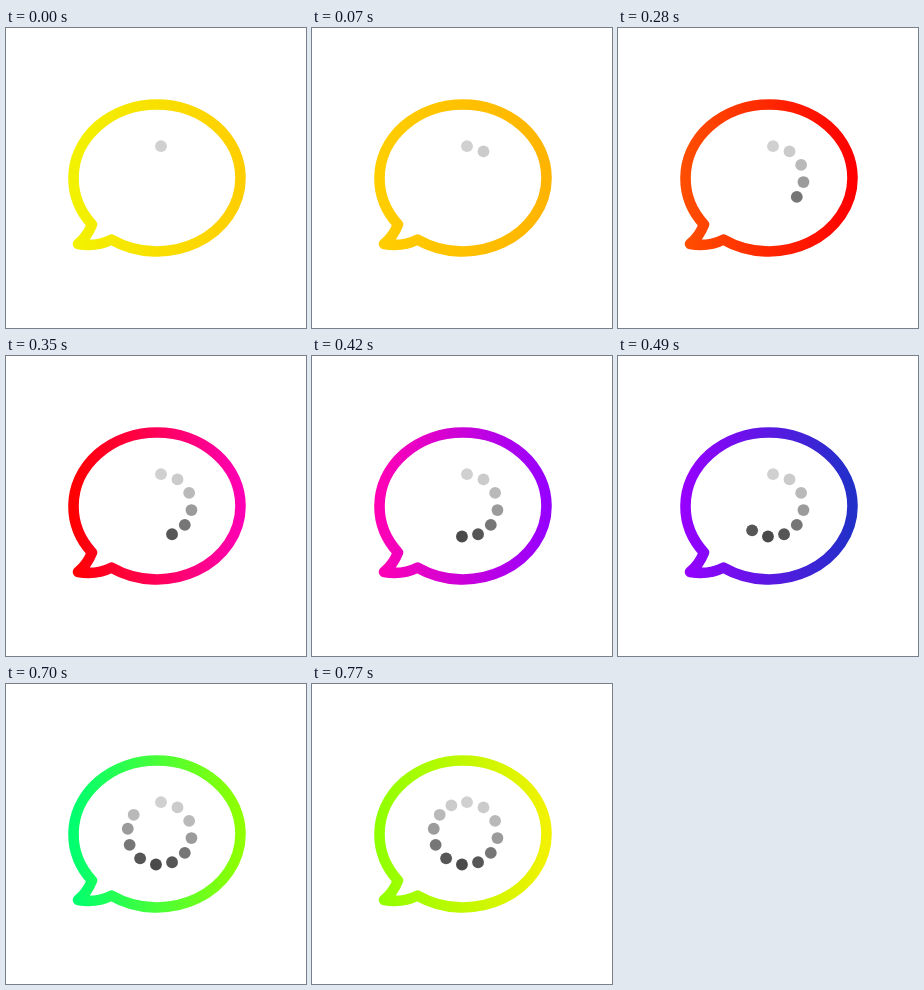
Recreate the animation shown at these times as an HTML page. Size 300 by 300 pixels, loop 840 ms.

```html
<!DOCTYPE html>
<html lang="en">
<head>
<meta charset="utf-8">
<title>Speech bubble loader</title>
<style>
  html, body { margin: 0; width: 100%; height: 100%; overflow: hidden; background: #fff; }
  svg { display: block; width: 100vw; height: 100vh; }
</style>
</head>
<body>
<svg viewBox="0 0 300 300">
  <defs>
    <linearGradient id="hue" gradientUnits="userSpaceOnUse" x1="66" y1="0" x2="236" y2="0">
      <stop id="left" offset="0"/><stop id="right" offset="1"/>
    </linearGradient>
  </defs>
  <path d="M86 196.500 A83.500 73.500 0 0 1 67.500 150 A83.500 73.500 0 0 1 234.500 150
           A83.500 73.500 0 0 1 105.500 211.600 Q91 219 72 216 Q81 209 86 196.500 Z"
        fill="none" stroke="url(#hue)" stroke-width="10.600" stroke-linejoin="round"/>
  <g id="dots"></g>
</svg>
<script>
  const STEP = 70;
  const COUNT = 12;

  // each step blends one colour into the next, left to right
  const wheel = ('#f2f200 #ffce00 #ffb400 #ff9600 #ff4e00 #ff0000 ' +
                 '#ff00b4 #9600ff #2030c8 #00b8ff #00ff70 #90ff00').split(' ');

  const left = document.getElementById('left');
  const right = document.getElementById('right');
  const group = document.getElementById('dots');

  function makeDot(i) {
    const turn = i / COUNT * 2 * Math.PI;
    const wave = Math.cos(turn);
    const wave2 = Math.cos(2 * turn);
    // the ring is spaced a little unevenly and is darkest at the bottom
    const angle = turn - (83.5 + 2 * wave + 2 * wave2) * Math.PI / 180;
    const grey = Math.round(148 + 67 * wave - 7 * wave2);
    const attrs = {
      cx: 153.6 + 32.2 * Math.cos(angle),
      cy: 149.4 + 31.3 * Math.sin(angle),
      r: 5.9,
      fill: `rgb(${grey},${grey},${grey})`
    };
    const dot = document.createElementNS('http://www.w3.org/2000/svg', 'circle');
    for (const key in attrs) dot.setAttribute(key, attrs[key]);
    return group.appendChild(dot);
  }

  const dots = Array.from({ length: COUNT }, (_, i) => makeDot(i));
  let shown = -1;

  function show(step) {
    if (step === shown) return;
    shown = step;
    left.setAttribute('stop-color', wheel[step]);
    right.setAttribute('stop-color', wheel[(step + 1) % COUNT]);
    dots.forEach((dot, i) => dot.setAttribute('visibility', i <= step ? 'visible' : 'hidden'));
  }

  function tick() {
    show(Math.floor(performance.now() / STEP) % COUNT);
    requestAnimationFrame(tick);
  }

  show(0);
  requestAnimationFrame(tick);
</script>
</body>
</html>
```
